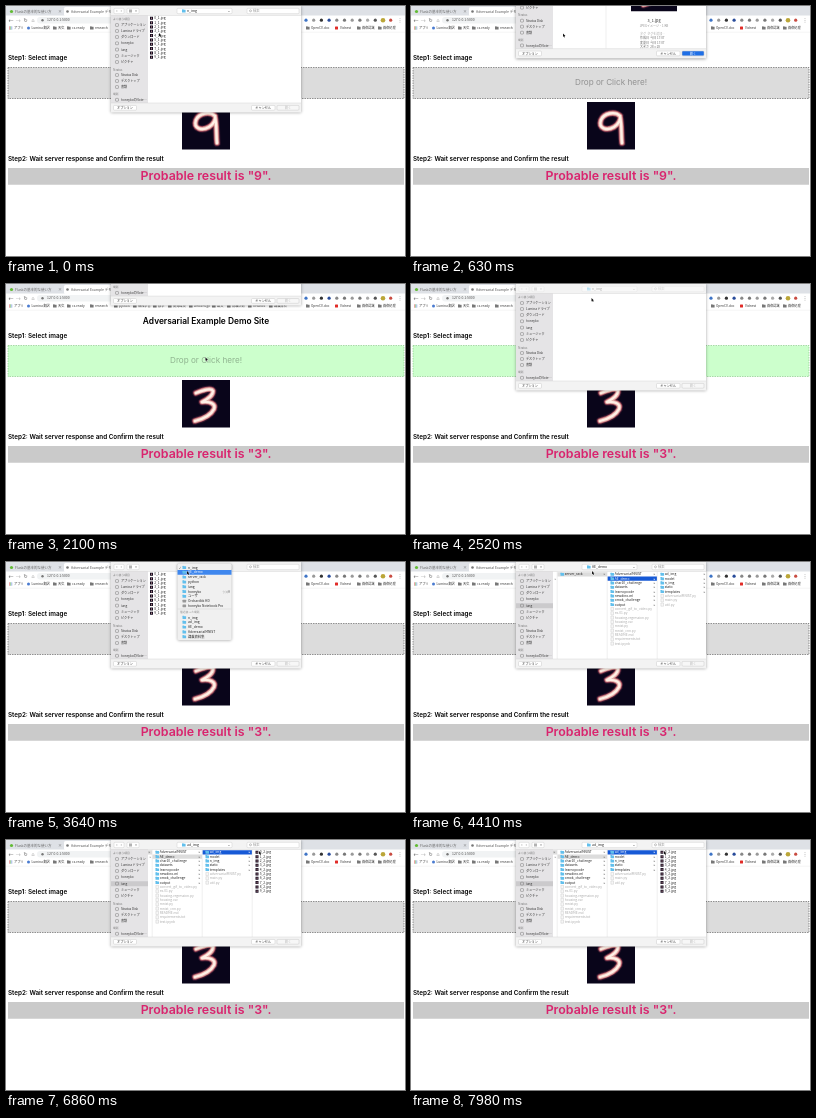
These frames come from a looping animation (399x250 px, 8000 ms). An HTML page with a canvas:

```html
<!DOCTYPE html>
<html lang="ja">
<head>
<meta charset="utf-8">
<style>
html, body { margin: 0; width: 100%; height: 100%; overflow: hidden; background: #fff; }
canvas { display: block; width: 399px; height: 250px; }
</style>
</head>
<body>
<canvas></canvas>
<script>
const LOOP = 8000, BLUE = '#1659d6', GRAY = '#dcdcdc', FOLDER = '#62bfec';
const canvas = document.querySelector('canvas'), c = canvas.getContext('2d');
const scale = window.devicePixelRatio || 1;
canvas.width = 399 * scale;
canvas.height = 250 * scale;

// Event times in ms
const PICK = 210, CLOSE = 530, NEW_IMAGE = 840, NEW_RESULT = 980, HOVER = 1300,
  OPEN = 2040, LOADED = 2600, MENU = 2940, CHOOSE = 4200, ENTER = 6400;

const cursorPath = [
  [0, 153, 27], [630, 152, 27.5], [900, 160, 36], [1650, 200, 75], [2060, 200, 75],
  [2450, 180.5, 14], [2550, 180.5, 14], [2800, 183, 5], [3000, 183, 5], [3400, 181, 9],
  [4450, 181, 9], [5600, 252.5, 18.5], [5900, 252.5, 18.5], [6300, 253, 11], [8000, 253, 11]
];

const seq = tail => Array.from({ length: 10 }, (_, i) => i + tail);
const digits = seq('_1.jpg'), variants = seq('_2.jpg');
const project = ['AdversarialMNIST', 'AE_demo', 'char10_challenge', 'datasets', 'learnopcode',
  'newdino-ml', 'omok_challenge', 'output', 'convert_gif_to_video.py', 'ex-01.py',
  'housing-regression.py', 'housing.csv', 'mnist.py', 'mnist_cnn.py', 'README.md',
  'requirements.txt', 'test.ipynb'];
const demo = ['ad_img', 'model', 'n_img', 'static', 'templates', 'adversarialMNIST.py', 'main.py', 'util.py'];
const menu = ['n_img', 'AE_demo', 'server_rack', 'python', 'lang', 'honeyko', 'ユーザ', 'Orchardbk HD', 'honeyko Notebook Pro'];
const recent = ['n_img', 'ad_img', 'AE_demo', 'AdversarialMNIST', '講義資料集'];
const sidebar = [
  [13, 'よく使う項目'], [19, 'アプリケーション', 1], [25, 'Lumina ドライブ', 1], [31, 'ダウンロード', 1],
  [37.3, 'honeyko', 1], [43.6, 'lang', 1], [50, 'ミュージック', 1], [56, 'ピクチャ', 1],
  [63.5, 'Stratus'], [69, 'Stratus Disk', 1], [75, 'デスクトップ', 1], [81, '書類', 1],
  [88, '場所'], [93.8, 'honeykoのNote…', 1]
];

const ease = x => (1 - Math.cos(Math.PI * Math.min(1, Math.max(0, x)))) / 2;

function rect(x, y, w, h, fill, r = 0, stroke) {
  c.beginPath();
  c.roundRect(x, y, w, h, r);
  if (fill) { c.fillStyle = fill; c.fill(); }
  if (stroke) { c.strokeStyle = stroke; c.lineWidth = .5; c.stroke(); }
}

function text(s, x, y, size, color = '#333', align = 'left', font = '"Noto Sans CJK JP", "Noto Sans"', weight = 400) {
  c.font = `${weight} ${size}px ${font}, sans-serif`;
  c.textAlign = align;
  c.textBaseline = 'alphabetic';
  c.fillStyle = color;
  c.fillText(s, x, y + size * .36);
}

const heading = (s, x, y, size, color, align, weight = 600) => text(s, x, y, size, color, align, 'Inter', weight);

function dot(x, y, r, color) {
  c.beginPath();
  c.arc(x, y, r, 0, 7);
  c.fillStyle = color;
  c.fill();
}

function line(points, color, width = .6) {
  c.beginPath();
  points.forEach(p => c.lineTo(...p));
  c.strokeStyle = color;
  c.lineWidth = width;
  c.stroke();
}

const folder = (x, y, color = FOLDER) => {
  rect(x, y - 1.6, 1.7, 1, color);
  rect(x, y - 1.2, 3.6, 2.7, color, .3);
};

function digit(n, x, y, size) {
  const shape = new Path2D(n === 9
    ? 'M33 14C28 9 17 11 14 18C11 27 20 29 27 25C32 22 34 17 33 14C35 24 34 32 35 41'
    : 'M14 13C19 11 29 7 31 11C31 16 26 19 20 22C28 21 34 24 32 29C29 35 21 39 13 41');
  c.save();
  c.translate(x, y);
  c.scale(size / 48, size / 48);
  rect(0, 0, 48, 47.5, '#09051a');
  c.lineCap = c.lineJoin = 'round';
  for (const [w, color] of [[7.5, '#51213b88'], [5.6, '#a9505f'], [4, '#e5b0a9'], [2.3, '#fff0e6']]) {
    c.lineWidth = w;
    c.strokeStyle = color;
    c.stroke(shape);
  }
  c.restore();
}

function browser() {
  rect(0, 0, 399, 10, '#dee1e6');
  rect(58, 1, 58, 9, '#fff', 1.5);
  dot(5.5, 5.5, 1.6, '#62bb35');
  text('Flaskの基本的な使い方', 9, 5.5, 3.5, '#666');
  text('×', 54, 5.5, 4, '#666', 'center');
  dot(61.5, 5.5, 1.3, '#777');
  text('Adversarial Example デモ', 65, 5.5, 3.5, '#555');
  rect(0, 9.5, 399, 17, '#fff');
  rect(31, 11, 264, 6.6, '#f1f3f4', 3.3);
  ['←', '→', '↻', '⌂'].forEach((s, i) => text(s, 5 + i * 7.3, 14.2, 5, i === 1 ? '#aaa' : '#555', 'center'));
  dot(36.5, 14.2, 1.2, '#777');
  text('127.0.0.1:5000', 41, 14.2, 3.4, '#444');
  ['#3e74c6', '#999', '#333', '#284b9a', '#888', '#777', '#999', '#777', '#aaa', '#555', '#bba638', '#c94b41']
    .forEach((color, i) => dot(300 + i * 7.7, 14.2, i === 10 ? 2.3 : 1.6, color));
  text('⋮', 394, 14.2, 5, '#555', 'center');

  for (let i = 0; i < 9; i++) rect(3 + i % 3 * 1.2, 20.4 + (i / 3 | 0) * 1.2, .8, .8, ['#d55', '#5a5', '#57c'][i % 3]);
  text('アプリ', 8, 22, 3.2);
  dot(22.5, 22, 1.5, '#4a7bd0');
  text('Lumina 翻訳', 25.5, 22, 3.2);
  const marks = [[47, '天気'], [61, 'cs-ready'], [84, 'research'], [108, 'python'], [127, '機械学習'],
    [147, '数学'], [162, '開発環境'], [183, 'webdesign'], [206, '論文'], [221, '就職活動'], [242, 'network'],
    [263, '講義資料'], [300, 'OpenCV-doc'], [351, '画像認識'], [372, '画像処理']];
  for (const [x, s] of marks) {
    folder(x, 22, '#777');
    text(s, x + 5, 22, 3.2);
  }
  rect(329, 20.5, 3, 3, '#e12c28', .5);
  text('Vidnest', 334, 22, 3.2);
  line([[0, 26.2], [399, 26.2]], '#e2e2e2', .4);
}

function page(t) {
  const green = t >= HOVER && t < LOADED + 40;
  heading('Adversarial Example Demo Site', 200, 37, 8.4, '#000', 'center');
  heading('Step1: Select image', 2, 52, 6.3, '#000', 'left');
  rect(2, 61.5, 396, 31, green ? '#ccffcc' : '#dcdcdc');
  c.setLineDash([1.5, 1]);
  rect(2, 61.5, 396, 31, null, 0, green ? '#68b568' : '#333');
  c.setLineDash([]);
  heading('Drop or Click here!', 200, 76.5, 8.15, green ? '#8fb38f' : '#919191', 'center', 400);
  digit(t < NEW_IMAGE ? 9 : 3, 176, 96, 48);
  heading('Step2: Wait server response and Confirm the result', 2, 152.5, 6.3, '#000', 'left');
  rect(2, 162, 396, 16.7, '#cacaca');
  heading(`Probable result is "${t < NEW_RESULT ? 9 : 3}".`, 200, 170, 12.4, '#d9246e', 'center');
}

function list(names, x, selected = -1, color = BLUE) {
  names.forEach((s, i) => {
    const y = 12.3 + i * 4.33, on = i === selected, blue = on && color === BLUE;
    const image = s.endsWith('.jpg'), dir = !s.includes('.');
    if (on) rect(x, y - 2.15, 49.5, 4.3, color);
    if (dir) {
      folder(x + 3, y);
      text('▸', x + 47, y, 3, blue ? '#fff' : '#777', 'center');
    } else if (image) {
      rect(x + 3, y - 1.5, 3, 3, '#160c20');
      rect(x + 4.2, y - .8, .7, 1.6, '#d9a3a3');
    } else rect(x + 3.4, y - 1.6, 2.6, 3.2, '#f7f7f7', 0, '#ccc');
    text(s, x + 7.2, y, 3.3, blue ? '#fff' : dir || image ? '#222' : '#aaa');
  });
}

function preview() {
  line([[195, 10], [195, 97]], '#ddd', .5);
  digit(3, 220, 14, 46);
  text('3_1.jpg', 243, 69, 3.8, '#222', 'center');
  text('JPEGイメージ・1 KB', 243, 74.5, 3, '#888', 'center');
  ['タグ  タグを追加…', '作成日  今日 17:07', '変更日  今日 17:07', '大きさ  28×28']
    .forEach((s, i) => text(s, 229, 82 + i * 4.5, 3, i ? '#666' : '#aaa'));
}

function columns(t) {
  const inside = t >= ENTER, x = 146.5 - 50 * ease((t - ENTER) / 250);
  list(['server_rack'], x, 0, GRAY);
  list(project, x + 50, 1, inside ? GRAY : BLUE);
  list(demo, x + 100, inside ? 0 : -1);
  if (inside) list(variants, x + 150);
  for (let k = 0; k < 4; k++) line([[x + k * 50 - .3, 9.5], [x + k * 50 - .3, 97]], '#ddd', .5);
  text('▸', 144.5, 16.6, 3, '#999', 'center');
}

function button(s, x, w, fill = '#fff', color = '#333') {
  rect(x, 99.4, w, 4.8, fill, 1, '#c8c8c8');
  text(s, x + w / 2, 101.8, 3.2, color, 'center');
}

function toolbar(t, loading) {
  c.globalAlpha = loading ? .35 : 1;
  rect(108, 2.3, 10, 5.4, '#fff', 1, '#ccc');
  text('‹   ›', 113, 4.8, 4.5, '#666', 'center');
  rect(121, 2.3, 12, 5.4, '#fff', 1, '#ccc');
  for (let i = 0; i < 3; i++) rect(123 + i, 3.6, .5, 2.8, '#666');
  text('▾', 130, 5, 3, '#666', 'center');
  rect(171, 2.3, 55, 5.4, '#fff', 1, '#ccc');
  const title = t < CHOOSE ? 'n_img' : t < ENTER ? 'AE_demo' : 'ad_img';
  folder(176, 5);
  text(title, 181, 5, 3.4, '#222');
  text('⌄', 223, 4.5, 4, '#555', 'center');
  rect(241, 2.3, 52, 5.4, '#fff', 1, '#ccc');
  c.beginPath();
  c.arc(244.5, 4.8, 1, 0, 7);
  c.strokeStyle = '#888';
  c.stroke();
  text('検索', 247, 5, 3.3, '#999');
  c.globalAlpha = 1;
}

function dialog(t) {
  const shown = t < OPEN ? 1 - ease((t - CLOSE) / 200) : ease((t - OPEN) / 203);
  if (!shown) return;
  const loading = t >= OPEN && t < LOADED, picked = t >= PICK && t < OPEN;
  c.save();
  c.translate(0, 107 * (shown - 1));
  c.save();
  c.shadowColor = '#0006';
  c.shadowBlur = 3 * scale;
  c.shadowOffsetY = .6 * scale;
  rect(105, -1, 190, 107.5, '#f3f3f3');
  c.restore();
  rect(105, 9.5, 37, 87.5, '#e5e4e6');
  rect(142, 9.5, 153, 87.5, '#fff');
  if (t >= CHOOSE) rect(105, 41.2, 37, 5, '#cbcacc');
  for (const [y, s, icon] of sidebar) {
    if (icon) rect(109.5, y - 1.4, 3, 2.8, null, .6, '#777');
    text(s, icon ? 115 : 107, y, icon ? 3.1 : 2.8, icon ? '#333' : '#777');
  }

  c.save();
  c.beginPath();
  c.rect(142, 9.5, 153, 87.5);
  c.clip();
  if (t >= CHOOSE) columns(t);
  else if (!loading) list(digits, 141, picked ? 3 : -1);
  if (picked) preview();
  c.restore();

  toolbar(t, loading);
  line([[105, 9.5], [295, 9.5]], '#ccc', .4);
  line([[105, 97], [295, 97]], '#ccc', .4);
  button('オプション', 107.5, 23);
  button('キャンセル', 245.5, 23.5);
  if (picked) button('開く', 271, 22, '#1f6fe6', '#fff');
  else button('開く', 271, 22, '#f7f7f7', '#bbb');
  c.restore();
}

function popup(cursorY) {
  c.save();
  c.shadowColor = '#0005';
  c.shadowBlur = 3 * scale;
  c.shadowOffsetY = .6 * scale;
  rect(171.5, 1.5, 54, 76.5, '#f0f0f0', 1.5);
  c.restore();
  const hot = Math.floor((cursorY - 3.1) / 4.8);
  menu.forEach((s, i) => {
    const y = 5.5 + i * 4.8;
    if (i === hot) rect(171.5, y - 2.4, 54, 4.8, '#3f87ee');
    if (!i) text('✓', 174, y, 3, '#333', 'center');
    if (i < 7) folder(176.5, y);
    else rect(176.5, y - 1.3, 3.6, 2.6, '#999', .4);
    text(s, 182, y, 3.3, i === hot ? '#fff' : '#222');
  });
  text('⇧⌘H', 224, 29.5, 2.8, '#555', 'right');
  line([[171.5, 47], [225.5, 47]], '#ccc', .4);
  text('最近使った場所', 174, 50.3, 2.8, '#888');
  recent.forEach((s, i) => {
    folder(176.5, 55.4 + i * 4.85);
    text(s, 182, 55.4 + i * 4.85, 3.3, '#222');
  });
}

function cursorAt(t) {
  const i = cursorPath.findIndex(p => p[0] > t), a = cursorPath[i - 1], b = cursorPath[i];
  const k = ease((t - a[0]) / (b[0] - a[0]));
  return [a[1] + (b[1] - a[1]) * k, a[2] + (b[2] - a[2]) * k];
}

function pointer(x, y) {
  const shape = new Path2D('M0 0V3.5L.8 2.8L1.4 4.1L2 3.8L1.4 2.6H2.5Z');
  c.save();
  c.translate(x, y);
  c.strokeStyle = '#fff';
  c.lineWidth = .6;
  c.stroke(shape);
  c.fillStyle = '#111';
  c.fill(shape);
  c.restore();
}

function draw(now) {
  const t = now % LOOP, [x, y] = cursorAt(t);
  c.setTransform(scale, 0, 0, scale, 0, 0);
  rect(0, 0, 399, 250, '#fff');
  page(t);
  browser();
  dialog(t);
  if (t >= MENU && t < CHOOSE) popup(y);
  pointer(x, y);
  requestAnimationFrame(draw);
}
requestAnimationFrame(draw);
</script>
</body>
</html>
```
